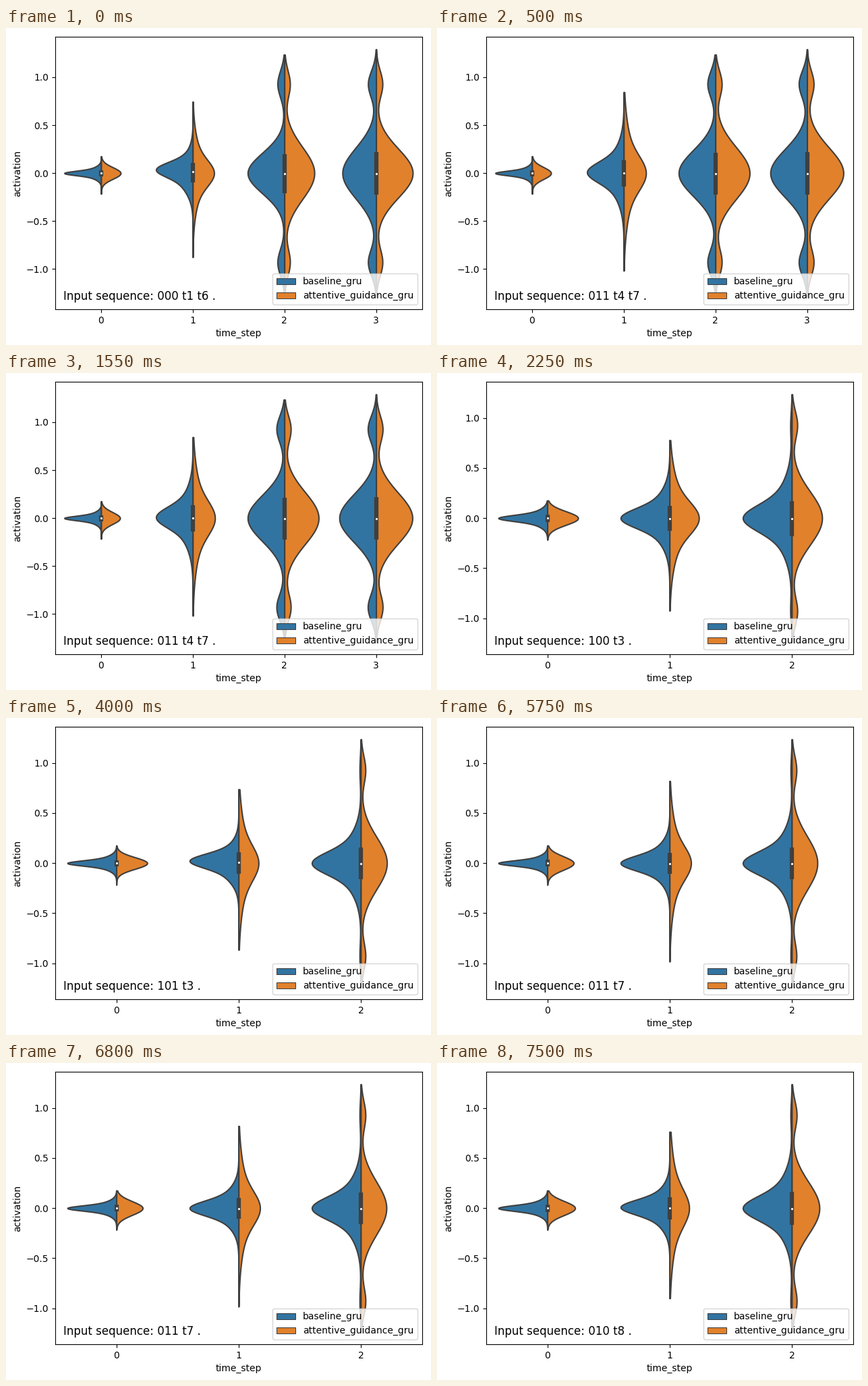
Animation, 630 px wide and 470 px high, one loop 8000 ms. Source, as a matplotlib script:

```python
import numpy as np
import matplotlib.pyplot as plt
from matplotlib.animation import FuncAnimation
from matplotlib.patches import Patch

W, H = 630, 470
INTERVAL = 250
FRAMES = 32
BLUE, ORANGE, EDGE = "#3274a1", "#e1812c", "#3f3f3f"
HALF = 0.4             # widest half violin, in category units
TAIL, SPREAD = .62, 2.25   # share and relative width of the broad component
LOBE_AT, LOBE_WIDTH = .93, .14

plt.rcParams["font.family"] = "DejaVu Sans"

# text, core widths of the two halves per step, reach of step 1, lean of step 1
SEQUENCES = [
    ("000 t1 t6", (.021, .072, .21, .265), (.06, .125, .27, .255), .81, .04),
    ("011 t4 t7", (.021, .1, .24, .25), (.062, .165, .27, .265), .93, .01),
    ("100 t3", (.028, .09, .123), (.068, .15, .265), .85, 0),
    ("101 t3", (.024, .065, .104), (.058, .16, .26), .8, .025),
    ("011 t7", (.024, .068, .104), (.068, .155, .265), .9, 0),
    ("010 t8", (.026, .068, .11), (.07, .17, .26), .83, .01),
]


def sequence_at(frame):
    """The first sequence lasts two frames, every later one seven."""
    return 0 if frame < 2 else 1 + (frame - 2) // 7


def bell(y, centre, width):
    return np.exp(-((y - centre) / width) ** 2 / 2) / width


def density(y, width, centre, tail, lobe):
    """Unit-area mix of a core, a broader tail and two outer lobes."""
    core = ((1 - tail) * bell(y, centre, width)
            + tail * bell(y, 0, SPREAD * width))
    lobes = bell(y, LOBE_AT, LOBE_WIDTH) + bell(y, -LOBE_AT, LOBE_WIDTH)
    return (1 - lobe) * core + lobe / 2 * lobes


def violin(step, long, blue_width, orange_width, reach, lean):
    late = step >= 2
    skew = 0 if late else .1 * reach ** 2 if step else .02
    y = np.linspace(-reach - skew, reach - skew, 400)
    centre = lean if step == 1 else 0
    merged = long and late
    blue = density(y, blue_width, centre, 0 if merged else TAIL,
                   .2 if merged else .04 * late)
    orange = density(y, orange_width, 0, TAIL if step == 1 else 0, .16 * late)
    return y, blue, orange


def draw_violin(x, y, blue, orange):
    scale = HALF / max(blue.max(), orange.max())
    for side, values, color in ((-1, blue, BLUE), (1, orange, ORANGE)):
        ax.fill_betweenx(y, x, x + side * scale * values, facecolor=color,
                         edgecolor=EDGE, linewidth=1.5)
    total = np.cumsum(blue + orange)
    low, mid, high = np.interp([.25, .5, .75], total / total[-1], y)
    ax.plot([x, x], [low, high], color=EDGE, lw=4.5, solid_capstyle="butt")
    ax.scatter(x, mid, s=9, color="white", edgecolor=EDGE,
               linewidth=.75, zorder=3)


fig = plt.figure(figsize=(W / 100, H / 100), dpi=100, facecolor="white")
ax = fig.add_axes([73 / W, 53 / H, 543.5 / W, 403.6 / H])


def update(frame):
    text, blues, oranges, first, lean = SEQUENCES[sequence_at(frame)]
    count = len(blues)
    reaches = (.195, first, 1.235, 1.29)[:count]
    ax.clear()
    for step, (b, o, reach) in enumerate(zip(blues, oranges, reaches)):
        draw_violin(step, *violin(step, count > 3, b, o, reach, lean))
    ax.set_xlim(-.5, count - .5)
    ax.set_ylim(-1.1 * reaches[-1], 1.1 * reaches[-1])
    ax.set_xticks(range(count))
    ax.set_yticks(np.arange(-1, 1.1, .5))
    ax.set_xlabel("time_step")
    ax.set_ylabel("activation")
    ax.text(.0225, .034, f"Input sequence: {text} .", fontsize=12,
            transform=ax.transAxes)
    ax.legend(handles=[
        Patch(facecolor=color, edgecolor=EDGE, lw=.75, label=label)
        for color, label in ((BLUE, "baseline_gru"),
                             (ORANGE, "attentive_guidance_gru"))
    ], loc="lower right")
    return []


anim = FuncAnimation(fig, update, frames=FRAMES, interval=INTERVAL,
                     init_func=lambda: update(0), repeat=True, repeat_delay=0)
plt.show()
```
